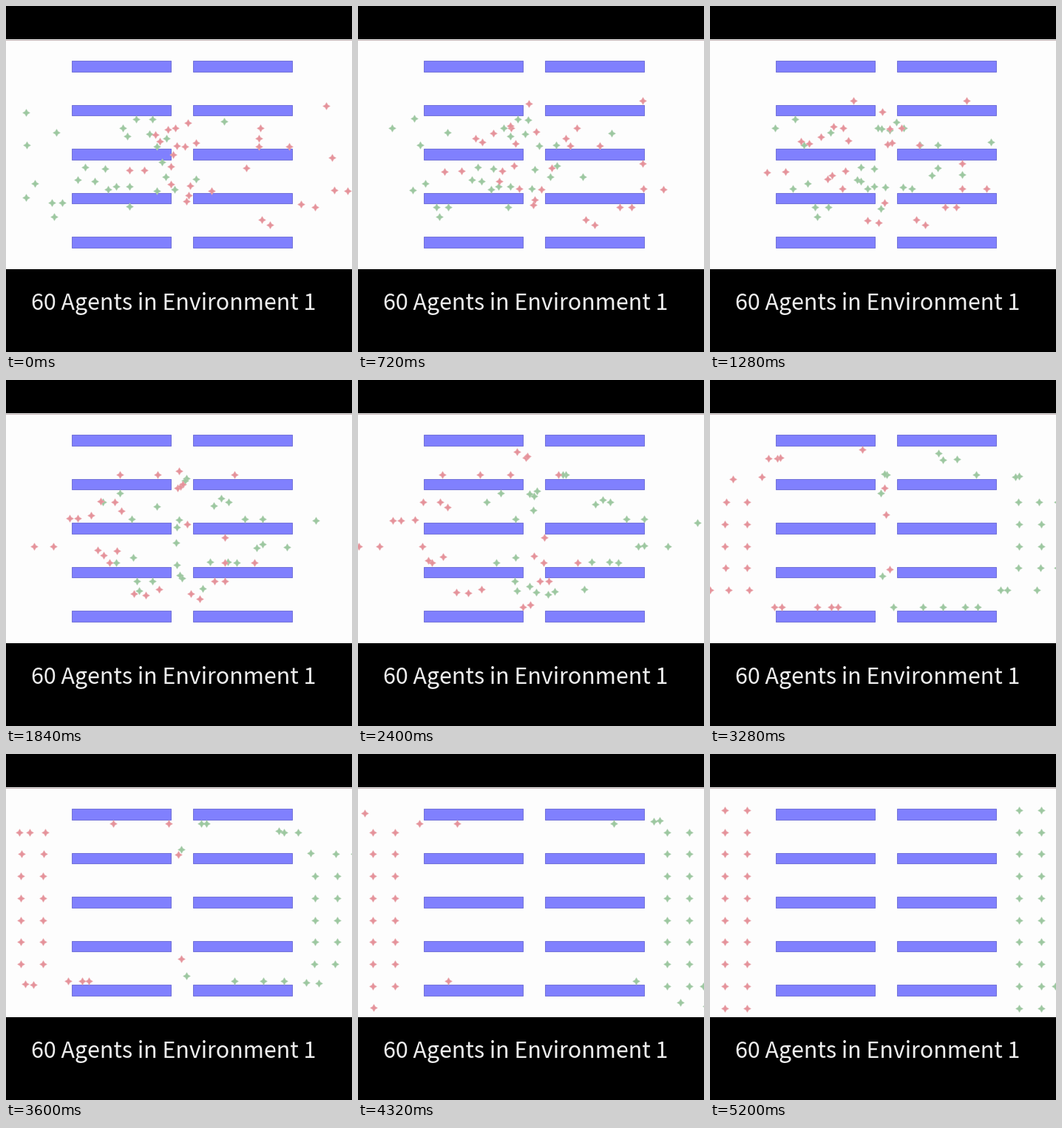
Recreate the animation shown at these times as a matplotlib script. Size 468 by 468 pixels, loop 5280 ms.

```python
import itertools

import numpy as np
import matplotlib.pyplot as plt
from matplotlib.animation import FuncAnimation
from matplotlib.patches import Rectangle

SIZE, DPI = 468, 100
FRAMES, STEP = 66, 80
PX = 72 / DPI

BAR_Y, PITCH = 81, 59.6      # first bar centre and spacing
MID, IN, OUT = 237, 82, 393  # middle gap, lane entrance, lane exit
CROSSED = 3600               # when the last agent is through the middle
SETTLE = 20                  # distance over which agents slow down

GREEN = [
    (27, 144), (68, 171), (28, 188), (39, 240), (27, 259), (62, 266),
    (76, 266), (65, 285), (107, 218), (134, 220), (97, 235), (120, 237),
    (138, 248), (149, 244), (167, 244), (167, 271), (158, 165), (164, 176),
    (176, 153), (198, 153), (194, 173), (217, 179), (204, 190), (211, 211),
    (216, 231), (204, 250), (228, 248), (257, 234), (295, 156), (-9, 165)]
RED = [
    (433, 135), (441, 205), (444, 249), (462, 250), (418, 272), (399, 268),
    (346, 289), (357, 296), (344, 165), (342, 179), (342, 190), (383, 190),
    (325, 219), (278, 250), (249, 243), (247, 256), (244, 264), (223, 241),
    (223, 217), (226, 201), (257, 185), (242, 190), (231, 189), (246, 158),
    (229, 165), (219, 167), (202, 174), (208, 183), (167, 222), (187, 222)]


def lane(y):
    return int(np.clip((y - BAR_Y) // PITCH, 0, 3))


def lane_y(y, ref=None):
    """Keep y clear of the bars in the lane of ref."""
    top = BAR_Y + PITCH * lane(y if ref is None else ref)
    return float(np.clip(y, top + 12.5, top + PITCH - 12.5))


def length(path):
    return sum(np.hypot(b[0] - a[0], b[1] - a[1]) for a, b in zip(path, path[1:]))


def along(path, dist):
    for a, b in zip(path, path[1:]):
        seg = np.hypot(b[0] - a[0], b[1] - a[1])
        if 0 < seg >= dist:
            f = dist / seg
            return a[0] + (b[0] - a[0]) * f, a[1] + (b[1] - a[1]) * f
        dist -= seg
    return path[-1]


def reach(t):
    """Free walking distance by time t; the pace rises as the crowd thins."""
    u = np.clip((t - 2300) / 700, 0, 1)
    return 0.07 * t + 0.12 * (350 * u * u + max(t - 3000, 0))


def seats(starts, columns):
    """Fill the middle rows first, the outer column first."""
    ends = [None] * len(starts)
    for g in range(5):
        group = sorted(range(6 * g, 6 * g + 6), key=lambda i: starts[i][1])
        for row, part in ((4 - g, group[:3]), (5 + g, group[3:])):
            for i, x in zip(sorted(part), columns):
                ends[i] = (x, 76 + 29.75 * row)
    return ends


class Agent:
    def __init__(self, start, goal, rank, past, count, rng):
        x, y = start
        ya = lane_y(y)
        self.lag, self.cross = 0, 0
        if x >= MID:
            yb = lane_y(goal[1]) if lane(goal[1]) == lane(y) else ya
            gap = [(250, ya)] if x < 250 else []
            self.inbound = [start]
            self.outbound = [start, *gap, (OUT, yb), goal]
            self.lag = 7 * rank
        else:
            yb = lane_y(goal[1] + rng.uniform(-12, 12), goal[1])
            mid = (MID, (ya + yb) / 2)
            entry = [(IN, ya)] if x < IN else []
            self.inbound = [start, *entry, (228, ya), mid]
            self.outbound = [mid, (246, yb), (OUT, lane_y(goal[1])), goal]
            self.cross = CROSSED * (rank - past + 1) / (count - past)
        self.way_in, self.way_out = length(self.inbound), length(self.outbound)

    def at(self, t):
        if t < self.cross:
            return along(self.inbound, self.way_in * t / self.cross)
        dist = reach(t) - reach(self.cross) - self.lag * (1 - np.exp(-t / 1000))
        knee = self.way_out - SETTLE
        if dist > knee:
            dist = self.way_out - SETTLE * np.exp((knee - dist) / SETTLE)
        return along(self.outbound, dist)


def crowd(starts, columns, seed):
    rng = np.random.default_rng(seed)
    starts = sorted(starts, key=lambda p: -p[0])
    past = sum(x >= MID for x, _ in starts)
    ends = seats(starts, columns)
    return [Agent(p, q, i, past, len(starts), rng)
            for i, (p, q) in enumerate(zip(starts, ends))]


def mirror(points):
    return [(2 * MID - x, y) for x, y in points]


greens = crowd(GREEN, (478, 448, 418), 3)
reds = crowd(mirror(RED), (484, 454, 424), 8)
# One green agent halts at the right edge of the view.
for agent in greens:
    x, y = agent.outbound[-1]
    if x == 478 and 310 < y < 320:
        agent.outbound[-1] = (467, y)
        agent.way_out = length(agent.outbound)

fig = plt.figure(figsize=(SIZE / DPI, SIZE / DPI), dpi=DPI, facecolor="black")
ax = fig.add_axes([0, 0, 1, 1])
ax.set_xlim(0, SIZE)
ax.set_ylim(SIZE, 0)
ax.axis("off")

ax.add_patch(Rectangle((0, 45), SIZE, 311, fc="#fdfdfd", ec="none"))
ax.plot([0, SIZE], [45.5, 45.5], color="#b9a9ab", lw=PX)
for x, row in itertools.product((88.5, 252.5), range(5)):
    ax.add_patch(Rectangle((x, BAR_Y - 7 + PITCH * row), 134, 14.5,
                           fc="#8080fe", ec="#7474d8", lw=PX))
ax.text(33.5, 411, "60 Agents in Environment 1", color="#eeeeee",
        family="Noto Sans CJK JP", size=30.4 * PX, va="baseline")

dots = [ax.plot([], [], ls="none", marker=(4, 1, 0), ms=9.5 * PX, mfc=face,
                mec=edge, mew=0.8 * PX, zorder=3)[0]
        for face, edge in (("#9cc8a0", "#accfae"), ("#e5929a", "#eaa6ac"))]


def draw(i):
    t = i * STEP
    dots[0].set_data(*zip(*[a.at(t) for a in greens]))
    dots[1].set_data(*zip(*mirror([a.at(t) for a in reds])))
    return dots


anim = FuncAnimation(fig, draw, frames=FRAMES, interval=STEP, repeat=True,
                     repeat_delay=0, blit=False)
plt.show()
```
